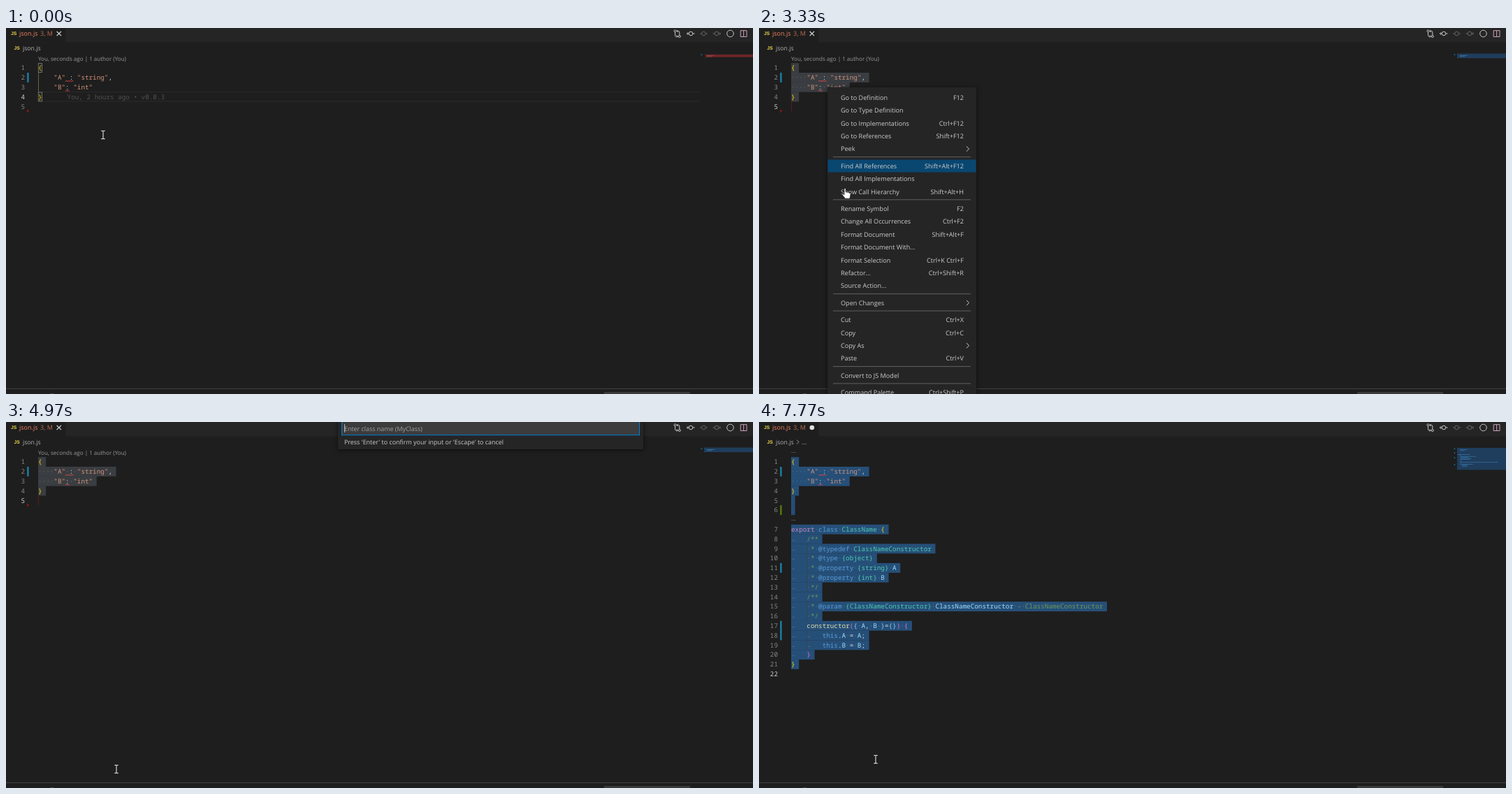
An HTML page that plays this animation: 1069 by 524 pixels, repeating every 8 s.

```html
<!DOCTYPE html>
<html lang="en">
<head>
<meta charset="utf-8">
<title>Convert JSON to a class</title>
<style>
  html, body { margin: 0; width: 100%; height: 100%; overflow: hidden; background: #1e1e1e; }
  svg { display: block; width: 100vw; height: 100vh; }
  text { white-space: pre; text-rendering: geometricPrecision; font: 9px "Open Sans", "Noto Sans", sans-serif; }
  .code { font: 9.3px "Noto Sans Mono", "DejaVu Sans Mono", monospace; }
  .js { font: 700 6.8px "Liberation Sans", sans-serif; fill: #e8d44d; }
  .lens { font-size: 8.06px; fill: #999; }
  .menu { font-size: 9.1px; fill: #ccc; }
  .num { fill: #858585; text-anchor: end; }
  .sel { fill: var(--sel); }
  .dots { fill: #e3e4e2; opacity: .25; }
  .line { fill: none; stroke: #c5c5c5; }
  .squiggle { fill: none; stroke: #f14c4c; stroke-width: .8; }
  #menu, #prompt { filter: drop-shadow(0 1px 3px #0009); }
</style>
</head>
<body>
<svg id="stage" viewBox="0 0 1069 524" preserveAspectRatio="none"></svg>
<script>
const LOOP = 8000, LEFT = 46, CHAR = 5.58, ROW = 13.8;
const colors = {
  w: '#d4d4d4', y: '#ffd700', o: '#da70d6', l: '#87cefa', s: '#ce9178', p: '#c586c0',
  b: '#569cd6', t: '#4ec9b0', c: '#6a9955', v: '#9cdcfe', f: '#dcdcaa'
};

// Each token starts with its colour key.
const rows = [
  'y{',
  'w    |s"A"|w : |s"string"|w,',
  'w    |s"B"|w: |s"int"',
  'y}',
  '',
  '',
  'pexport |bclass |tClassName |y{',
  'w\t|c/**',
  'w\t|c * |b@typedef |tClassNameConstructor',
  'w\t|c * |b@type |t{object}',
  'w\t|c * |b@property |t{string}|v A',
  'w\t|c * |b@property |t{int}|v B',
  'w\t|c */',
  'w\t|c/**',
  'w\t|c * |b@param |t{ClassNameConstructor}|v ClassNameConstructor|c - ClassNameConstructor',
  'w\t|c */',
  'w\t|fconstructor|o(|l{|v A|w,|v B |l}|w=|l{}|o) {',
  'w\t\t|bthis|w.|vA|w = |vA|w;',
  'w\t\t|bthis|w.|vB|w = |vB|w;',
  'w\t|o}',
  'y}',
  ''
];

const menuItems = [
  'Go to Definition|F12', 'Go to Type Definition', 'Go to Implementations|Ctrl+F12',
  'Go to References|Shift+F12', 'Peek|>', '-',
  'Find All References|Shift+Alt+F12', 'Find All Implementations', 'Show Call Hierarchy|Shift+Alt+H', '-',
  'Rename Symbol|F2', 'Change All Occurrences|Ctrl+F2', 'Format Document|Shift+Alt+F',
  'Format Document With...', 'Format Selection|Ctrl+K Ctrl+F', 'Refactor...|Ctrl+Shift+R', 'Source Action...', '-',
  'Open Changes|>', '-',
  'Cut|Ctrl+X', 'Copy|Ctrl+C', 'Copy As|>', 'Paste|Ctrl+V', '-',
  'Convert to JS Model', '-',
  'Command Palette...|Ctrl+Shift+P'
];

const rect = (x, y, w, h, fill, extra = '') =>
  `<rect x="${x}" y="${y}" width="${w}" height="${h}" fill="${fill}" ${extra}/>`;
const text = (x, y, str, extra = '') => `<text xml:space="preserve" x="${x}" y="${y}" ${extra}>${str}</text>`;
const path = (d, extra = 'class="line"') => `<path d="${d}" ${extra}/>`;
const ring = (x, y, r) => `<circle class="line" cx="${x}" cy="${y}" r="${r}"/>`;
const group = (id, body) => `<g id="${id}">${body}</g>`;
const rowTop = n => 50.2 + ROW * (n - 1 + (n > 6 ? 1 : 0));
const col = c => LEFT + c * CHAR;
const caret = (id, x, y, h = ROW) => rect(x, y, 1, h, '#aeafad', `id="${id}"`);
const mark = (n, count, fill) => rect(30.2, rowTop(n), 2.4, ROW * count, fill);
const plain = row => row.split('|').map(t => t.slice(1)).join('').replace(/\t/g, '    ');

function codeRow(row, n) {
  const y = rowTop(n) + 10.1, line = plain(row);
  let c = 0, out = '', white = '';
  if (n < rows.length) {
    out += `<rect class="sel" x="${LEFT}" y="${rowTop(n)}" width="${(line.length + 1) * CHAR}" height="${ROW + .1}"/>`;
  }
  if (line.search(/\S/) > 4) out += rect(col(4), rowTop(n), .8, ROW, '#404040');
  for (const token of row ? row.split('|') : []) {
    const raw = token.slice(1), str = raw.replace(/\t/g, '    ');
    out += text(col(c), y, str, `class="code" fill="${colors[token[0]]}"`);
    white += raw.replace(/[^ \t]/g, '_').replace(/ /g, '·').replace(/\t/g, '→___');
    c += str.length;
  }
  const dots = [...white].map((ch, i) => ch === '_' ? '' : text(col(i), y, ch, 'class="code"')).join('');
  return out + `<g class="dots">${dots}</g>` + text(27, y, n, `class="code num" id="num${n}"`);
}

function miniRow(row, n) {
  const str = plain(row), len = str.trim().length;
  return rect(1000 + (str.length - len) * .72, 36.2 + n * 1.4, len * .72, .9, 'currentColor', 'opacity=".7"');
}

function squiggle(c, n, count) {
  const y = rowTop(n) + 12.8;
  return path(`M${col(c)} ${y}` + 'l1.4-1.7l1.4 1.7'.repeat(count * 2), 'class="squiggle"');
}

function buildMenu() {
  let y = 99.5 - 18.4, out = rect(98, 85, 213, 445, '#252526') + rect(98.5, 0, 212, 18, '#094771', 'id="hover"');
  const centers = [];
  for (const item of menuItems) {
    if (item === '-') {
      out += rect(106, y + 11, 197, 1, '#606060');
      y += 6;
      continue;
    }
    const [label, key] = item.split('|');
    y += 18.4;
    centers.push(y);
    out += text(117, y + 3.2, label, 'class="menu"');
    if (key === '>') out += path(`M296.8 ${y - 3.6}l3.8 3.6l-3.8 3.6`);
    else if (key) out += text(293, y + 3.2, key, 'class="menu" text-anchor="end"');
  }
  return [out, centers];
}

const [menuBody, centers] = buildMenu();
const code = rows.map((r, i) => codeRow(r, i + 1));
const mini = rows.map((r, i) => miniRow(r, i + 1));

const base = rect(0, 0, 1069, 524, '#1e1e1e') + rect(0, 0, 1069, 20.5, '#252526') + rect(0, 0, 85.5, 20.5, '#1e1e1e') +
  text(7, 10.4, 'JS', 'class="js"') + text(19, 11.3, 'json.js', 'fill="#ec8262"') + text(49, 11.3, '3, M', 'fill="#bf6b50"') +
  text(11.5, 31, 'JS', 'class="js"') + text(24, 31.8, 'json.js', 'fill="#b0b0b0" style="font-size:8.7px"') +
  rect(0, 516, 1069, 1, '#414141') + rect(856, 521, 123, 3, '#3a3a3a') + rect(63, 523, 5, 1, '#444');

const icons = ring(957.5, 4.3, 1.5) + ring(963.8, 12, 1.5) +
  path('M957.5 6v4.5q0 1.5 1.5 1.5h2.3m-1.5-1.6l1.6 1.6l-1.6 1.6M963.8 10.4V6q0-1.5-1.5-1.5h-2.3m1.5-1.6l-1.6 1.6l1.6 1.6') +
  ring(980, 8, 2.8) + path('M977 8h-2.6m1.6-1.7l-1.7 1.7l1.7 1.7M983 8h2.5') +
  `<g opacity=".4">${ring(998.5, 8, 2.8) + path('M995.5 8h-2.5M1001.5 8h2.5')}
   ${ring(1017, 8, 2.8) + path('M1014 8h-2.5M1020 8h2.6m-1.6-1.7l1.7 1.7l-1.7 1.7')}</g>` +
  ring(1036.5, 8, 4.8) +
  path('M1051.2 3.7h8.8v8.8h-8.8zM1055.6 3.7v8.8', 'fill="none" stroke="#c8a2b4"');

const box = n => rect(LEFT + .3, rowTop(n) + .5, 5.2, 12.8, '#0640061a', 'stroke="#888" stroke-width=".8"');
const idle = rect(LEFT, 91.2, 948, 1, '#2b2b2b') + rect(LEFT, 104.4, 948, 1, '#2b2b2b') +
  rect(LEFT, 64, .9, 27.4, '#6f6a48') + box(1) + box(4) +
  text(87.6, rowTop(4) + 10.1, 'You, 2 hours ago • v0.0.3', 'class="code" fill="#505050"') +
  rect(1001, 37.8, 68, 4, '#6b2529');

const blue = '#1f3d5c';
const more = rect(999, 37, 70, 31.5, blue) + `<g color="#3c7cb4">${mini.join('')}</g>` +
  [44, 51, 61].map(y => rect(994.6, y - .5, 1.6, 1.4, '#1b81a8')).join('') + code.slice(5).join('') +
  `<rect class="sel" x="${LEFT}" y="${rowTop(5)}" width="${CHAR}" height="${ROW}"/>` +
  `<circle cx="75.8" cy="8" r="3.3" fill="#e0e0e0"/>` +
  path('M54 25.6l3 3l-3 3', 'fill="none" stroke="#a0a0a0"') + text(61, 31.8, '...', 'fill="#b0b0b0"');
const late = mark(6, 1, '#587c0c') + mark(11, 1, '#1b81a8') + mark(17, 2, '#1b81a8');

const inputBox = rect(475, -5, 437, 44, '#252526') + rect(480.5, -5, 426, 23.7, '#3c3c3c', 'stroke="#007fd4"') +
  text(484, 13, 'Enter class name (MyClass)', 'fill="#a0a0a0" style="font-size:8.92px"') +
  text(484, 31.8, "Press 'Enter' to confirm your input or 'Escape' to cancel", 'fill="#ccc" style="font-size:8.93px"');

const solid = 'fill="#fff" stroke="#000" stroke-width=".6"';
const pointer =
  group('beam', path('M-2.6-5.6h1.8l.8.7l.8-.7h1.8M0-5v10M-2.6 5.6h1.8l.8-.7l.8.7h1.8', 'fill="none" stroke="#e0e0e0" stroke-width="1.1"')) +
  group('arrow', path('M1 0v11l2.6-2.4l1.7 3.9l1.6-.7l-1.7-3.8h3.5z', solid)) +
  group('hand', path('M-1 .9q1-1.5 2.1 0v4.9q4.6.2 6.3 1.8q.8.7.5 2.6l-1 5h-6.6l-4.1-5.5q-.6-1.7.9-1.4l1.9 1.4z', solid));

const stage = document.getElementById('stage');
stage.innerHTML = base + icons + group('idle', idle) +
  group('miniSel', rect(999, 36.6, 70, 6.6, blue)) +
  group('mini', mini.slice(0, 4).join('')) + rect(994.6, 37.6, 1.6, 1.4, '#1b81a8') +
  code.slice(0, 4).join('') + text(27, rowTop(5) + 10.1, 5, 'class="code num" id="num5"') +
  squiggle(7, 2, 2) + squiggle(7, 3, 1) + mark(2, 1, '#1b81a8') +
  group('before', path('M72.6 4.8l6.4 6.4m0-6.4l-6.4 6.4', 'fill="none" stroke="#e0e0e0" stroke-width="1.2"') +
    path('M30.2 116.6l3 2.4l-3 2.4z', 'fill="#94151b"')) +
  group('author', text(LEFT, 46.5, 'You, seconds ago | 1 author (You)', 'class="lens"')) +
  group('more', more) + group('late', late) +
  group('lenses', text(LEFT, 44, '...', 'class="lens"') + text(LEFT, 141, '...', 'class="lens"')) +
  group('stale', rect(LEFT, rowTop(5), 1, ROW, '#5a1d1d')) +
  caret('caret4', 51, rowTop(4)) + caret('caret5', LEFT, rowTop(5)) + caret('caret22', LEFT, rowTop(22)) +
  group('menu', menuBody) + group('prompt', inputBox) + caret('caretIn', 484, 3, 12) +
  group('pointer', pointer);

const el = id => document.getElementById(id);

// When each part is on: pairs of start and end.
const spans = {
  idle: [0, 1430], miniSel: [1430, 7300], mini: [0, 7300], before: [0, 7300], author: [0, 7300],
  more: [7300, LOOP], late: [7500, LOOP], lenses: [7300, LOOP], stale: [2790, 7230],
  caret4: [420, 880], caret5: [1430, 1970, 2520, 2790, 7230, 7300], caret22: [7300, 7770],
  caretIn: [4970, 5430, 5960, 6500, 7030, 7230],
  menu: [2790, 4830], prompt: [4900, 7230],
  beam: [0, 2790, 4830, LOOP], arrow: [2790, 3190], hand: [3190, 4830]
};
const parts = Object.entries(spans).map(([id, s]) => [el(id), s]);

// Pointer moves: first step, last step, target.
const moves = [
  [2170, 2590, 98, 85], [3190, 3330, 123, 229], [3400, 3610, 141, 470], [3680, 3750, 144, 483],
  [3950, 4020, 149, 504], [4220, 4220, 149, 505], [4420, 4560, 158, 497],
  [5430, 5500, 160, 493], [5760, 5960, 167, 483]
];
const hovers = [[3190, 0], [3260, 4], [3330, 5], [3400, 8], [3470, 11], [3540, 14], [3610, 18], [3680, 19], [3750, -1], [3950, 20]];

function pointerAt(t) {
  let x = 139, y = 153;
  for (const [start, end, tx, ty] of moves) {
    if (t < start) break;
    const n = Math.round((end - start) / 70) + 1;
    const k = Math.min(n, Math.floor((t - start + 12) / 70) + 1) / n;
    x += (tx - x) * k;
    y += (ty - y) * k;
  }
  return [x, y];
}

function draw(t) {
  for (const [node, s] of parts) {
    const on = s.some((from, i) => i % 2 === 0 && t >= from && t < s[i + 1]);
    node.style.display = on ? '' : 'none';
  }
  const selecting = t >= 1430, faded = t >= 2790 && t < 7230;
  stage.style.setProperty('--sel', !selecting ? 'none' : faded ? '#3a3d41' : '#264f78');
  stage.querySelectorAll('.dots').forEach(d => d.style.display = selecting ? '' : 'none');
  el('mini').style.color = selecting ? '#4a83b5' : '#a05058';
  const active = t < 1430 ? 4 : t < 7300 ? 5 : 22;
  for (const n of [4, 5, 22]) el('num' + n).style.fill = n === active ? '#d0d0d0' : '';

  let row = -1;
  for (const [from, r] of hovers) if (t >= from) row = r;
  el('hover').style.display = row < 0 ? 'none' : '';
  if (row >= 0) el('hover').setAttribute('y', centers[row] - 9);
  el('pointer').setAttribute('transform', `translate(${pointerAt(t)})`);
}

const began = performance.now();
function tick() {
  draw((performance.now() - began) % LOOP);
  requestAnimationFrame(tick);
}
tick();
</script>
</body>
</html>
```
